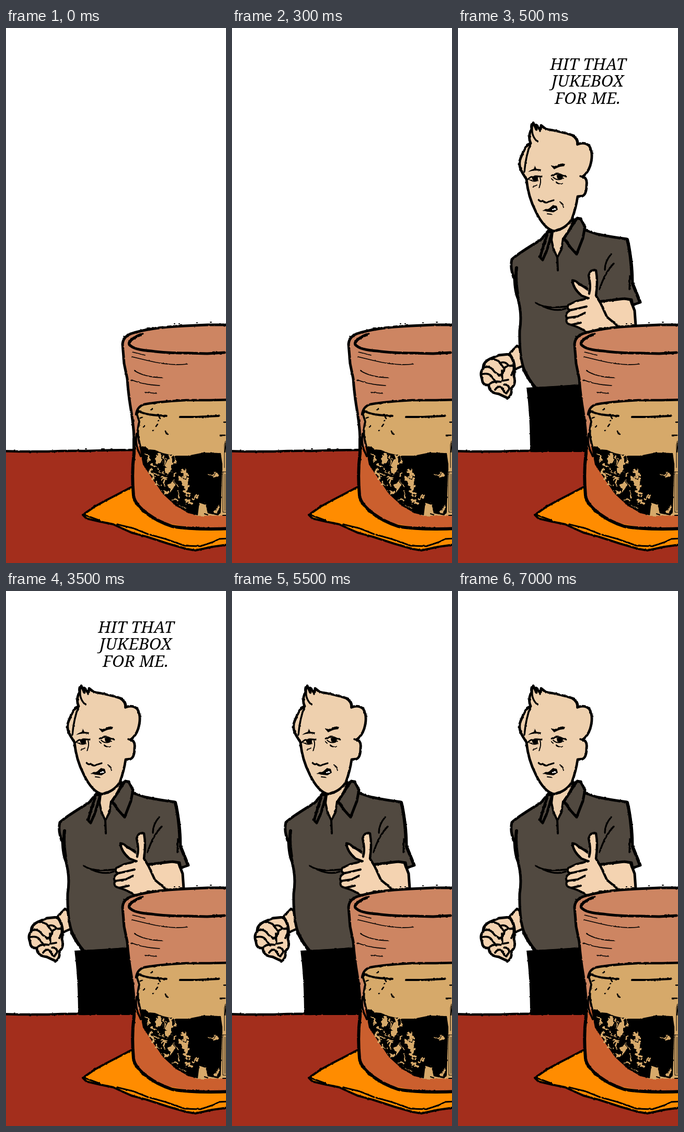
These frames come from a looping animation (421 px wide and 1022 px high, 8000 ms). An HTML page:

```html
<!DOCTYPE html>
<html lang="en">
<head>
<meta charset="utf-8">
<title>At the bar</title>
<style>
html, body { margin: 0; width: 100%; height: 100%; overflow: hidden; background: #fff; }
svg { display: block; width: 100%; height: 100%; }
.line { fill: none; stroke: #000; stroke-linecap: round; stroke-linejoin: round; }
text { font: italic 31px "Noto Serif", "Liberation Serif", serif; text-anchor: middle; }
#man, #words { opacity: 0; }
#glints { filter: url(#ragged); }
#table, #man, #glass { filter: url(#brush); }
</style>
</head>
<body>
<svg viewBox="0 0 421 1022" preserveAspectRatio="none">
  <defs>
    <filter id="ragged" filterUnits="userSpaceOnUse" x="0" y="0" width="421" height="1022">
      <feTurbulence type="fractalNoise" baseFrequency=".13" numOctaves="2" seed="4"/>
      <feDisplacementMap in="SourceGraphic" scale="15" xChannelSelector="R" yChannelSelector="G"/>
    </filter>
    <filter id="brush" filterUnits="userSpaceOnUse" x="-20" y="-20" width="461" height="1062">
      <feTurbulence type="fractalNoise" baseFrequency=".14" numOctaves="2" seed="9"/>
      <feDisplacementMap in="SourceGraphic" scale="2.4" xChannelSelector="R" yChannelSelector="G"/>
    </filter>
  </defs>
  <g id="table"></g>
  <g id="man"></g>
  <g id="glass"></g>
  <g id="glints"></g>
  <g id="edge"></g>
  <g id="words">
    <text x="249" y="80">HIT THAT</text>
    <text x="248" y="112">JUKEBOX</text>
    <text x="248" y="145">FOR ME.</text>
  </g>
</svg>
<script>
const NS = 'http://www.w3.org/2000/svg';
const layer = id => document.getElementById(id);

function add(id, d, attrs) {
  const el = document.createElementNS(NS, 'path');
  el.setAttribute('d', d);
  for (const k in attrs) el.setAttribute(k, attrs[k]);
  layer(id).append(el);
}
const fill = (id, color, d) => add(id, d, { fill: color });
const ink = (id, width, d) => add(id, d, { class: 'line', 'stroke-width': width });
const shape = (id, color, width, d) => { fill(id, color, d); ink(id, width, d); };

const FACE = '#eed0ae', HAND = '#f4d3b1', SHIRT = '#51483f';
const CLAY = '#cd8562', RUST = '#cb5e2e', FOAM = '#d6a96b';

// Table and coaster
fill('table', '#a32e1a', 'M-20 809L80 809Q150 806 260 806H441V1042H-20Z');
ink('table', 4.5, 'M-9 808L26 809L80 809Q120 807 150 808Q200 806 246 806');
ink('table', 2, 'M138 805h1M152 804h2M183 804h5M201 804h1');
fill('table', '#ff8c00', 'M147 930L190 903L240 877L431 930V986L395 991L372 998L345 995L270 972L212 951L165 941Z');
ink('table', 4, 'M240 877L221 887L190 903L170 914L147 930L154 937L180 943L205 948L240 964L270 972L310 985L345 995L362 998L395 991L431 986');
ink('table', 3, 'M150 930L180 941M212 948L245 956L272 967M276 968L305 976L342 989L372 990L396 982L408 976L431 975');

// Trousers, shirt, arms
fill('man', '#000', 'M131 687L148 686L240 679L252 810L138 810Q138 740 131 687Z');
shape('man', HAND, 4.5, 'M113 607L98 622Q108 632 109 652L125 645L118 611Z');
shape('man', HAND, 5, 'M276 522L328 514L338 540L340 568L300 585L240 578L262 515Z');
shape('man', SHIRT, 5, 'M173 387L158 405Q116 430 103 442Q99 460 108 479Q109 505 115 518Q123 548 118 578Q117 626 126 651Q137 674 147 688Q190 688 236 682L245 575L240 530L275 522L318 517L332 519L334 529L349 524L334 487Q334 440 323 403Q290 399 264 393L243 386L235 364L219 367Z');
ink('man', 6, 'M112 458Q109 481 115 514M127 655Q136 673 148 687M334 488L348 523M324 404Q331 431 333 479');
ink('man', 3.3, 'M149 525Q166 537 208 532M163 532Q188 543 206 536M293 432Q281 446 281 462M298 450Q281 467 271 499M329 474L328 499M123 646Q127 658 134 665M145 688L228 683');

// Neck and collar
fill('man', FACE, 'M179 384L179 408L190 438L203 401L220 365Z');
ink('man', 4, 'M181 389L179 405L183 423L190 438L198 423L201 402M190 438L191 463M220 364L219 377L203 400');
shape('man', SHIRT, 5, 'M173 388L166 408L157 438L162 443L170 425L180 391Z');
shape('man', SHIRT, 5, 'M220 375L228 363L235 365L243 380L239 401L227 432L216 420L203 402Z');

// Head
shape('man', FACE, 4.8, 'M139 220Q133 207 141 193Q139 184 144 181L150 194L150 185L158 194L159 186L168 193Q203 199 222 206Q230 213 229 222Q242 217 251 225Q260 239 253 263Q248 278 238 284Q248 286 246 300Q246 318 238 321L229 322Q226 343 218 365Q207 383 184 388Q165 384 149 351Q134 322 131 289L124 278Q114 262 120 248L127 232Q132 223 139 220Z');
ink('man', 3.5, 'M139 221Q130 242 127 275M143 183Q138 205 152 217M151 185L157 197M219 206Q229 212 228 223M234 283L243 286');
fill('man', '#000', 'M134 275Q140 270 146 269L147 263L150 269L159 270L158 273Q145 271 134 275Z');
fill('man', '#000', 'M177 262L185 264L197 258L205 260L203 264Q194 264 184 270Z');
ink('man', 2.9, 'M134 289Q139 283 149 283L160 284M179 282Q190 276 199 281L207 284');
ink('man', 1.9, 'M137 290Q146 295 153 291M157 286Q160 294 155 305M143 304L151 300M182 285Q190 293 202 287M188 294Q194 300 200 297M179 287L182 291');
fill('man', '#000', 'M141 284Q151 281 153 286Q153 292 147 293Q142 292 141 284ZM189 281Q199 278 201 284Q200 290 194 290Q189 289 189 281Z');
ink('man', 3.2, 'M154 328Q158 333 162 330Q167 336 173 332L183 329');
fill('man', '#000', 'M161 349L174 345L182 338L189 340L191 347L183 352L173 351Z');
fill('man', '#fff', 'M180 345L186 344L187 347L180 348Z');
ink('man', 2, 'M194 332Q202 335 202 343M171 355L180 356');

// Pointing hand
fill('man', HAND, 'M249 516L236 511Q220 497 219 482Q227 482 233 492L250 504L250 472Q255 458 264 464Q269 487 265 510L274 528L286 554L307 570L285 583L241 578L214 567Q203 560 208 552Q204 543 214 539Q205 534 211 529Z');
ink('man', 4.4, 'M249 516L236 511Q220 497 219 482Q227 483 232 490Q241 493 247 498M251 507Q255 495 250 473Q254 459 264 463Q268 484 264 511L273 526L285 552L307 570');
ink('man', 4, 'M250 516L226 522L211 529Q207 538 216 539L246 532M214 540Q204 545 208 554L229 551L243 544M208 555Q205 565 217 567L235 563M216 567Q228 570 242 578');

// Resting fist
shape('man', HAND, 4.8, 'M98 623L78 625L61 632Q47 639 48 651Q41 658 46 671Q47 683 59 682Q59 697 78 699L95 707Q104 702 102 688Q112 680 107 665Q112 640 98 623Z');
ink('man', 3.8, 'M62 632Q76 633 80 639L88 650M49 649Q61 643 70 657L80 664M47 661Q61 658 66 668L73 677M58 682Q67 673 82 676M80 640Q90 636 96 644M88 650Q92 645 106 645Q108 655 102 663M78 664Q88 661 89 651M84 654L85 674L96 672M71 691Q76 683 83 686L89 696M88 681Q98 681 98 690L92 698');

// Glass
fill('glass', CLAY, 'M223 599Q226 589 238 583Q275 569 340 568L431 567V957Q315 957 275 932Q246 912 243 893Q241 850 245 806Q248 775 241 738Q237 705 232 668Q224 640 223 599Z');
fill('glass', RUST, 'M245 800L431 800V957Q315 957 275 932Q246 912 243 893Q241 850 245 800Z');
ink('glass', 5, 'M431 567L386 567L342 569Q275 572 239 584Q224 590 223 604L226 641L232 670Q234 700 240 735Q246 770 245 806');
ink('glass', 6, 'M245 785L245 812Q240 850 244 893Q246 910 272 929Q291 943 318 952Q360 959 431 956');
ink('glass', 5.2, 'M257 586Q232 597 236 605Q245 615 278 617Q306 621 348 621L385 622L418 620');
ink('glass', 3, 'M262 584Q244 588 238 600');
ink('glass', 1.7, 'M242 619L266 625M241 628L270 635Q314 646 347 642M245 654Q264 667 300 668M240 672Q260 681 294 683M266 696L288 698');
ink('glass', 2, 'M225 589h1M232 585h1M322 565h1M331 565h1M365 563h1M391 562h2M271 573h4');

// Drink
fill('glass', FOAM, 'M249 738Q251 724 264 718Q300 711 356 711L431 709V931L366 932Q332 918 300 889Q276 857 268 832L260 802Q250 785 254 762Z');
ink('glass', 4.4, 'M431 710L390 711L345 711Q290 714 264 719Q251 723 249 738L254 732');
ink('glass', 3.8, 'M250 736L255 752Q249 774 257 799M250 775Q247 790 252 805L258 818');
ink('glass', 3.8, 'M254 732Q269 740 307 741M290 739L307 741M333 743L365 743L407 741');
ink('glass', 2.6, 'M277 730l4-3M257 745l4-1M263 762l2-2M287 761l3-4M293 743l2 3M305 770l2 5M291 750h1M281 769h1M309 776h1M417 753h4M410 778h9');
fill('glass', '#000', 'M255 798L266 800L274 805L285 806L300 812L322 817L348 817L378 811L411 812L414 833L411 925L406 931L386 927L382 911L370 907L367 931L350 927L325 913L300 890L281 862L262 834Z');

// Light showing through the drink, broken up by the ragged filter
const glint = (width, d) =>
  add('glints', d, { class: 'line', style: `stroke:${FOAM}`, 'stroke-width': width });
glint(9, 'M291 818L292 828M310 826L309 848M335 862L345 875M378 915L377 927');
glint(6, 'M315 820L315 842M338 844L345 850L342 858M348 862L342 885L349 891M344 902L354 908M312 876L318 872L315 884M400 924L406 916');
glint(4, 'M268 812L273 824M279 834L290 841M284 848L292 856M299 862L306 858L303 870M329 887L331 897M318 855L324 851M361 898L368 893M405 853L399 857M276 845L283 860M302 884L310 890');
glint(2.5, 'M301 816L302 836M325 822L321 832M294 846L301 850M287 866L294 874M321 864L329 876M320 899L330 904M334 912L344 920M390 854L400 851');

// Right side of the glass
fill('edge', FOAM, 'M414 815H421V927H414Z');
ink('edge', 1, 'M420 789L418 796V840M415 848V925H421M419 852V922M413 848h8');
ink('edge', 2.2, 'M421 793L419 810M413 832V845M415 931h6M380 928l6 2');

// Shown from and until, in ms
const LOOP = 8000;
const cues = [['man', 500, 8000], ['words', 500, 5500]];
for (const [id, from, to] of cues) {
  const steps = [[0, 0], [from, 1], [to, 0], [LOOP, 0]];
  layer(id).animate(
    steps.map(([t, opacity]) => ({ offset: t / LOOP, opacity, easing: 'step-end' })),
    { duration: LOOP, iterations: Infinity });
}
</script>
</body>
</html>
```
